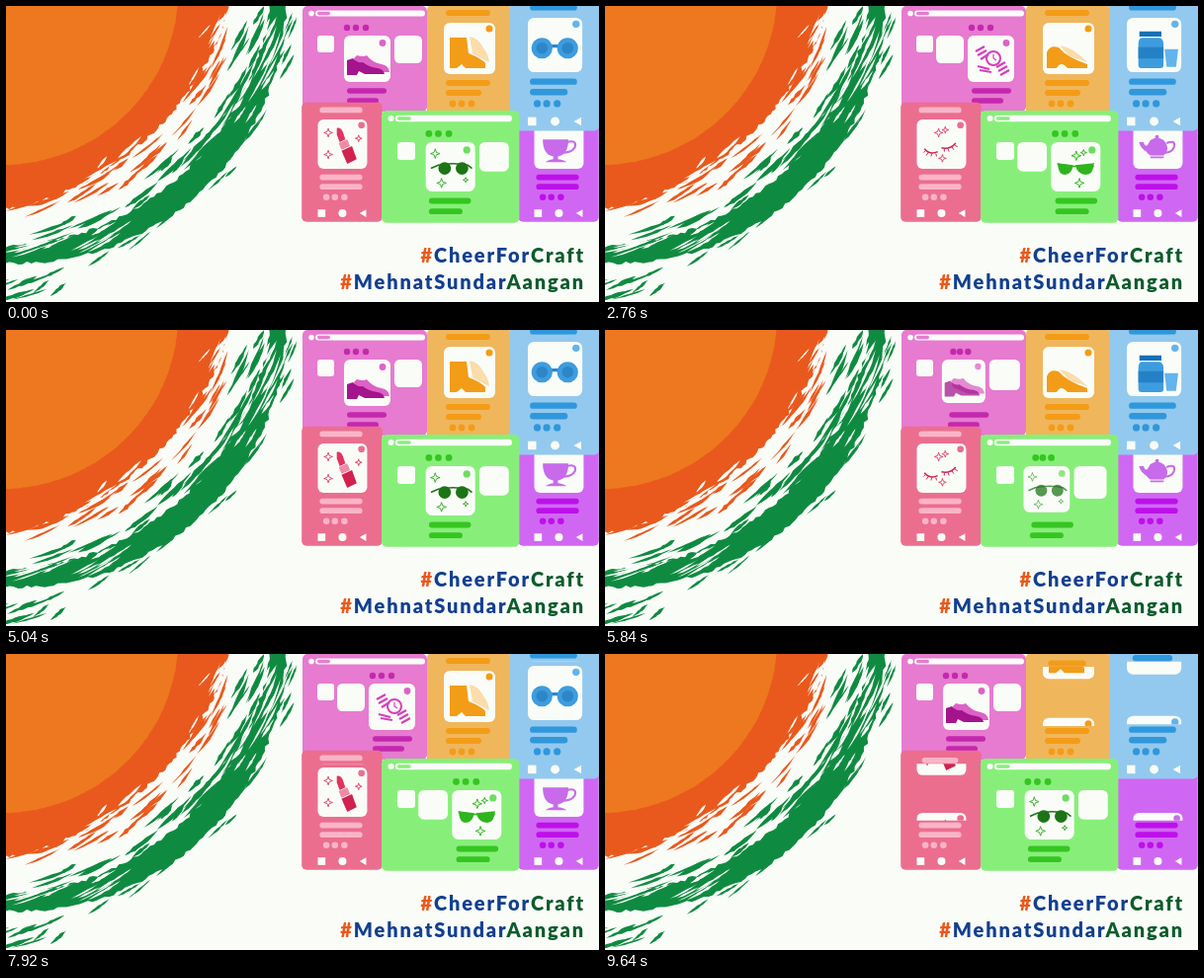
An HTML page with a canvas for the animation above (9680 ms loop, 600 by 300 pixels).

```html
<!DOCTYPE html>
<html lang="en">
<head>
<meta charset="utf-8">
<style>
  html, body { margin: 0; width: 600px; height: 300px; overflow: hidden; background: #fafcf8; }
  canvas { display: block; }
  p {
    position: absolute; top: 238.5px; right: 14px; margin: 0; text-align: right; white-space: nowrap;
    font: 900 20px/27px Lato, sans-serif; letter-spacing: 1.85px; color: #123f90;
  }
  i { font-style: normal; color: #e9591d; }
  b { font-weight: inherit; color: #0d5c2c; }
</style>
</head>
<body>
<canvas id="stage" width="600" height="300"></canvas>
<p><i>#</i>CheerFor<b>Craft</b><br><i>#</i>MehnatSundar<b>Aangan</b></p>
<script>
const LOOP = 9680, PAPER = '#fafcf8', ORANGE = '#e9591d', GREEN = '#0f8b41';
const stage = document.getElementById('stage');
let ctx = stage.getContext('2d');

const clamp = v => Math.max(0, Math.min(1, v));
const lerp = (a, b, k) => a + (b - a) * k;
const span = (t, from, to) => clamp((t - from) / (to - from));
const easeInOut = k => k < .5 ? 2 * k * k : 1 - 2 * (1 - k) ** 2;
const easeOut = k => 1 - (1 - k) ** 3;
const easeOutExpo = k => k < 1 ? 1 - 2 ** (-10 * k) : 1;

function box(x, y, w, h, r, color) {
  ctx.fillStyle = color;
  ctx.beginPath();
  ctx.roundRect(x, y, w, h, r);
  ctx.fill();
}
const dot = (x, y, r, color) => box(x - r, y - r, 2 * r, 2 * r, r, color);
const bar = (x, y, w, h, color) => box(x, y - h / 2, w, h, h / 2, color);

// Brush strokes around the top left corner
let seed = 11;
const random = (a = 0, b = 1) => {
  seed = (seed * 16807) % 2147483647;
  return lerp(a, b, seed / 2147483647);
};
const polar = (r, deg) => {
  const a = deg * Math.PI / 180;
  return [2 + r * Math.cos(a), -22 + r * Math.sin(a)];
};
function polygon(points, color) {
  ctx.fillStyle = color;
  ctx.beginPath();
  points.forEach(p => ctx.lineTo(...p));
  ctx.fill();
}
function ring(inner, outer, rough, color) {
  const out = [], back = [];
  for (let a = -3; a <= 96; a += .9) {
    out.push(polar(outer(a) + random(-rough, rough), a));
    back.unshift(polar(inner(a) + random(-rough, rough), a));
  }
  polygon([...out, ...back], color);
}
function streak(r, a, length, width, drift, color) {
  const near = [], far = [];
  for (let i = 0; i <= 8; i++) {
    const k = i / 8, half = width / 2 * Math.sin(Math.PI * k) * random(.5, 1.2);
    near.push(polar(r + drift * (k - .5) - half, a + length * k));
    far.unshift(polar(r + drift * (k - .5) + half, a + length * k));
  }
  polygon([...near, ...far], color);
}
function streaks(count, [r0, r1], [a0, a1], [l0, l1], [w0, w1], color) {
  while (count--) {
    const a = random(a0, a1), drift = lerp(-9, 9, a / 80) + random(-3, 3);
    streak(random(r0, r1), a, random(l0, l1), random(w0, w1), drift, color);
  }
}
function paintBrush() {
  const swell = a => Math.sin(Math.PI * clamp(a / 92));
  ring(() => 0, a => 228 - 18 * swell(a), 1.6, ORANGE);
  streaks(24, [204, 230], [4, 64], [4, 11], [2, 5], PAPER);
  streaks(34, [214, 236], [2, 80], [5, 13], [2, 5], ORANGE);
  ring(() => 0, a => 172 + 11 * a / 90, .3, '#ee781f');
  ring(a => 266 - 5 * swell(a), a => 282 + 5 * swell(a), 1.6, GREEN);
  streaks(36, [240, 264], [1, 76], [4, 12], [2, 6], GREEN);
  streaks(18, [282, 296], [4, 88], [3, 7], [2, 4], GREEN);
  streaks(10, [296, 318], [78, 91], [3, 7], [2, 5], GREEN);
  streaks(16, [262, 284], [2, 28], [4, 10], [2, 4], PAPER);
  streaks(16, [262, 284], [62, 92], [4, 10], [1.5, 4], PAPER);
}

// Product pictures: [path, colour, line width when stroked]
const disc = (x, y, r) => `M${x - r} ${y}a${r} ${r} 0 1 0 ${2 * r} 0a${r} ${r} 0 1 0 ${-2 * r} 0Z`;
const star = (x, y, r = 4.5) => {
  const q = r / 4;
  return `M${x} ${y - r}l${q} ${r - q} ${r - q} ${q} ${q - r} ${q} ${-q} ${r - q} ${-q} ${q - r} ${q - r} ${-q} ${r - q} ${-q}Z`;
};
const picture = (...parts) => parts.map(([d, ...style]) => [new Path2D(d), ...style]);

const shoe = picture(
  ['M10 23L13 20Q20 22 23 20Q28 27 38 29Q45 30 46 37H28L12 30Z', '#dd62c6'],
  ['M3 25L9 23Q13 28 19 27Q25 32 34 33Q40 34 41 39H21L15 36 13 40H3Z', '#a3148d']);
const watch = picture(
  ['M8 16l9-5M10 20l9-5M13 24l8-5M29 32l9-5M31 36l9-5M33 40l9-5', '#d63fbd', 2.2],
  ['M12 35l12 2M10 31l12 3', '#d63fbd', 2],
  [disc(26, 23, 7), '#d63fbd', 2], ['M26 19V23L29 25', '#d63fbd', 1.2]);
const roundShades = picture(
  [disc(18, 25, 6) + disc(34.5, 25, 6), '#1d7416'],
  ['M5 25L12 22Q26 19 40 22L44 25', '#1d7416', 1.5],
  [star(9, 11) + star(15, 39) + star(38, 36, 2.5), '#3faa34', .9]);
const catShades = picture(
  ['M6 20L21 22Q20 31 13 31Q8 31 7 25ZM23 22L41 20 40 25Q39 31 33 31Q25 31 23 22Z', '#2fb41d'],
  ['M6 21L21 23H41', '#2fb41d', 1.4],
  [star(24, 13) + star(31, 10, 3) + star(27, 39), '#2fb41d', .9]);
const boot = picture(
  ['M26 14Q35 15 41 27Q45 32 46 40L42 38Q34 34 29 31Z', '#fbdcaa'],
  ['M6 15H23L25 31Q38 36 42 41V46H22L18 42 13 46H6Z', '#f39c17']);
const heel = picture(
  ['M17 23Q31 25 45 40L27 34Z', '#fbdcaa'],
  ['M4 46V30Q7 22 16 25Q24 35 45 42V46H25Q18 38 14 46Z', '#f39c17']);
const goggles = picture(
  ['M16 27H36', '#2c86c8', 3],
  [disc(13.5, 29, 10) + disc(38, 29, 10), '#3d9cde'],
  [disc(13.5, 29, 5.5) + disc(38, 29, 5.5), '#2c86c8']);
const jar = picture(
  ['M14 19H31Q35 20 35 25V45Q35 48 32 48H14Q11 48 11 45V25Q11 20 14 19Z', '#3d9cde'],
  ['M12 13H33V18H12Z', '#1470b8'],
  ['M11 28H35V39H11Z', '#2581c6'],
  ['M36 30H49L47 47H38Z', '#62b4ec']);
const lipstick = picture(
  ['M20 9Q25 8 27 15L29 21 23 24 20 16Z', '#e0345f'],
  ['M22 25L31 21 34 28 25 32Z', '#f08aa5'],
  ['M25 33L36 28 41 42 31 47Z', '#d1224f'],
  [star(11, 14) + star(11, 37) + star(43, 20, 3.5), '#e0345f', .9]);
const lashes = picture(
  ['M8 31Q14 38 22 34M26 30Q35 32 41 25', '#d1224f', 1.6],
  ['M9 33l-2 2M12 35l-2 3M16 36l-1 3M20 36l1 3M29 31l0 3M33 31l1 3M37 29l2 3M40 27l3 2', '#d1224f', 1],
  [star(23, 14) + star(30, 11, 3.5) + star(27, 41, 4), '#e0345f', .9]);
const cup = picture(
  ['M34 24Q45 21 43 29Q40 35 31 35', '#c76bea', 2.2],
  ['M9 21H36Q36 37 25 39V42Q32 43 34 45H12Q14 43 20 42V39Q9 37 9 21Z', '#c76bea']);
const teapot = picture(
  ['M35 25Q45 21 43 29Q41 35 33 35', '#c76bea', 2.2],
  ['M18 22Q25 17 32 22Q40 31 32 38H18Q15 36 14 34Q8 31 6 24H11Q12 29 15 27ZM18 39H32V41H18Z', '#c76bea'],
  [disc(25, 18.5, 2), '#c76bea']);

function show(parts) {
  for (const [path, color, width] of parts) {
    ctx.fillStyle = ctx.strokeStyle = color;
    ctx.lineWidth = width || 0;
    width ? ctx.stroke(path) : ctx.fill(path);
  }
}

// Alternates between two states: index of each and the time since the last switch
function alternate(t, start, gap) {
  const n = Math.floor((t - start) / gap);
  return { from: Math.abs(n % 2), to: Math.abs((n + 1) % 2), age: t - start - n * gap };
}
function place(x, y, scale, draw) {
  ctx.save();
  ctx.translate(x, y);
  ctx.scale(scale, scale);
  draw();
  ctx.restore();
}

function phone(t, x, y, scale, { body, line, pin = line, short, pics }) {
  const { from, to, age } = alternate(t, 784, 2180);
  const card = (shift, pic) => place(0, shift, 1, () => {
    box(0, 0, 52, 52, 6, PAPER);
    dot(46, 6, 3.5, pin);
    show(pic);
  });
  const shrink = 1 - span(age, 140, 160);
  const grow = delay => Math.max(shrink, easeOut(span(age, 170 + delay, 310 + delay)));
  const stripe = (row, width, k) => bar(2 + width * (1 - k) / 2, row, width * k, 6, line);

  place(x, y, scale, () => {
    box(-17, -18, 85, 126, 5, body);
    ctx.save();
    ctx.beginPath();
    ctx.rect(-2, -4, 57, 60);
    ctx.clip();
    const out = easeOutExpo(span(age, 0, 622));
    if (out < 1) card(-56 * out, pics[from]);
    card(60 * (1 - easeInOut(span(age, 65, 291))), pics[to]);
    ctx.restore();
    const nudge = Math.sin(Math.PI * span(age, 40, 340));
    stripe(-10 + 3 * nudge, 45, 1 - .18 * nudge);
    stripe(61, 45, grow(0));
    stripe(71, short ? 36 : 45, grow(35));
    [9, 18, 28].forEach((cx, i) => {
      const k = grow(30 + 40 * i);
      dot(cx, 82 + 3 * (1 - k), 3.4 * k, line);
    });
    box(0, 95, 8, 8, 0, PAPER);
    dot(26, 99, 4.2, PAPER);
    polygon([[44, 99], [51, 95], [51, 103]], PAPER);
  });
}

function browser(t, x, y, scale, { body, line, pin, width, pics }) {
  const { from, to, age } = alternate(t, 1000, 2300);
  const move = delay => lerp(from, to, easeInOut(span(age, delay, 640 + delay)));
  const slide = (delay, x) => x + 26 * move(delay);
  const tile = (k, x, size, pic) => {
    box(x, 30, size, size, 4 + size / 24, PAPER);
    const visible = span(k, .4, 1);
    if (!visible) return;
    place(x, 30, size / 47, () => {
      ctx.globalAlpha = visible;
      dot(39, 7.5, 3.4, pin);
      show(pic);
    });
  };
  place(x, y, scale, () => {
    box(0, 0, width, 107, 5, body);
    dot(9, 7.5, 2.8, PAPER);
    bar(13, 7.5, 111, 6, PAPER);
    bar(15, 7.5, 13, 3.4, body);
    box(15, 30, 17, 17, 3, PAPER);
    const k = move(60);
    tile(1 - k, lerp(42, 35, k), lerp(47, 28, k), pics[0]);
    tile(k, lerp(93, 67, k), lerp(28, 47, k), pics[1]);
    [45, 54, 64].forEach((cx, i) => dot(slide(40 * i, cx), 22, 3.2, line));
    bar(slide(80, 45), 86, 40, 5.5, line);
    bar(slide(120, 45), 96, 32, 5.5, line);
  });
}

const brush = new OffscreenCanvas(600, 300);
const stageContext = ctx;
ctx = brush.getContext('2d');
paintBrush();
ctx = stageContext;

const devices = [
  [browser, 300, 0, 1, { body: '#e67bd0', line: '#c428ae', pin: '#dd62c6', width: 126, pics: [shoe, watch] }],
  [phone, 443, 17, 1, { body: '#f0b65c', line: '#f39c17', short: true, pics: [boot, heel] }],
  [phone, 534.5, 115, .96, { body: '#d067f3', line: '#bd10ea', pin: '#c76bea', pics: [cup, teapot] }],
  [phone, 528, 12, 1.06, { body: '#93c9ee', line: '#2f97dc', pin: '#62b4ec', short: true, pics: [goggles, jar] }],
  [phone, 315.5, 115, .96, { body: '#eb6e8f', line: '#f9b4c7', pin: '#eb6e8f', pics: [lipstick, lashes] }],
  [browser, 380, 106, 1.064, { body: '#87ef79', line: '#36c522', pin: '#6fdc60', width: 131, pics: [roundShades, catShades] }]
];

function frame(now) {
  const t = now % LOOP;
  ctx.fillStyle = PAPER;
  ctx.fillRect(0, 0, 600, 300);
  ctx.drawImage(brush, 0, 0);
  for (const [draw, ...settings] of devices) draw(t, ...settings);
  requestAnimationFrame(frame);
}
requestAnimationFrame(frame);
</script>
</body>
</html>
```
